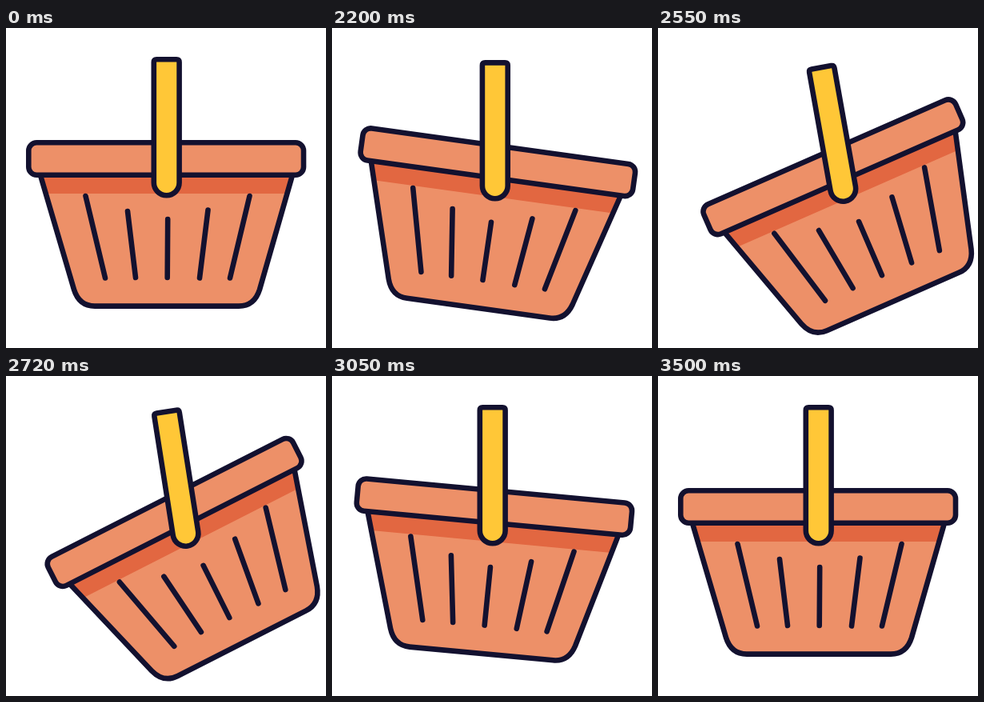
These frames come from a looping animation (400x400 px, 3.52 s). An HTML page:

```html
<!DOCTYPE html>
<html lang="en">
<head>
<meta charset="utf-8">
<title>Swinging basket</title>
<style>
  html, body { margin: 0; width: 100%; height: 100%; overflow: hidden; background: #fff; }
  svg { display: block; width: 100%; height: 100%; }
  .line { stroke: #13112f; stroke-width: 6.6; stroke-linecap: round; stroke-linejoin: round; }
  .coral { fill: #ed9068; }
  .shade { fill: #e26741; }
  .yellow { fill: #ffc737; }
  .none { fill: none; }
</style>
</head>
<body>
<svg viewBox="0 0 400 400">
  <g id="swing">
    <g id="basket">
      <path class="coral" d="M43 184 L85 327 Q91.500 347.600 111 347.600 H291 Q310.500 347.600 317 327 L358 184Z"/>
      <path class="shade" d="M43 184 H358 L351.400 207 H49.800Z"/>
      <path class="line none" d="M43 184 L85 327 Q91.500 347.600 111 347.600 H291 Q310.500 347.600 317 327 L358 184"/>
      <path class="line none" d="M99.500 210 L124 312.500 M152 229 L162 312 M202.200 239 L201.700 312 M252.500 227.500 L242 312.500 M304.500 210 L280 312.500"/>
      <rect class="line coral" x="28.300" y="143.300" width="343.700" height="40.400" rx="10"/>
    </g>
    <path class="line yellow" d="M184.800 193.300 V42.800 Q184.800 39.300 188.300 39.300 H213.100 Q216.600 39.300 216.600 42.800 V193.300 A15.900 15.900 0 0 1 184.800 193.300Z"/>
  </g>
</svg>
<script>
  const LOOP = 3520;

  // [time in ms, value]; each stretch eases in and out
  const tracks = {
    x: [[2074, 0], [2560, 18.4], [3010, 0]],
    y: [[2000, 0], [2450, 9.6], [2960, 0]],
    handle: [[2220, 0], [2610, -10.8], [3030, 0]],
    basket: [[2000, 0], [2186, 8], [2660, -28.6], [3145, 9], [3500, 0]]
  };

  const swing = document.getElementById('swing');
  const basket = document.getElementById('basket');

  function valueAt(keys, t) {
    const i = keys.findIndex(([time]) => time > t);
    if (i <= 0) return 0;
    const [t0, a] = keys[i - 1], [t1, b] = keys[i];
    const s = (t - t0) / (t1 - t0);
    return a + (b - a) * s * s * (3 - 2 * s);
  }

  function draw(t) {
    const at = name => valueAt(tracks[name], t);
    swing.setAttribute('transform',
      `translate(${at('x')} ${at('y')}) rotate(${at('handle')} 200.7 124)`);
    // The basket hangs from the handle but keeps its own angle
    basket.setAttribute('transform', `rotate(${at('basket') - at('handle')} 200.7 193)`);
  }

  const start = performance.now();
  function frame() {
    draw((performance.now() - start) % LOOP);
    requestAnimationFrame(frame);
  }
  frame();
</script>
</body>
</html>
```
